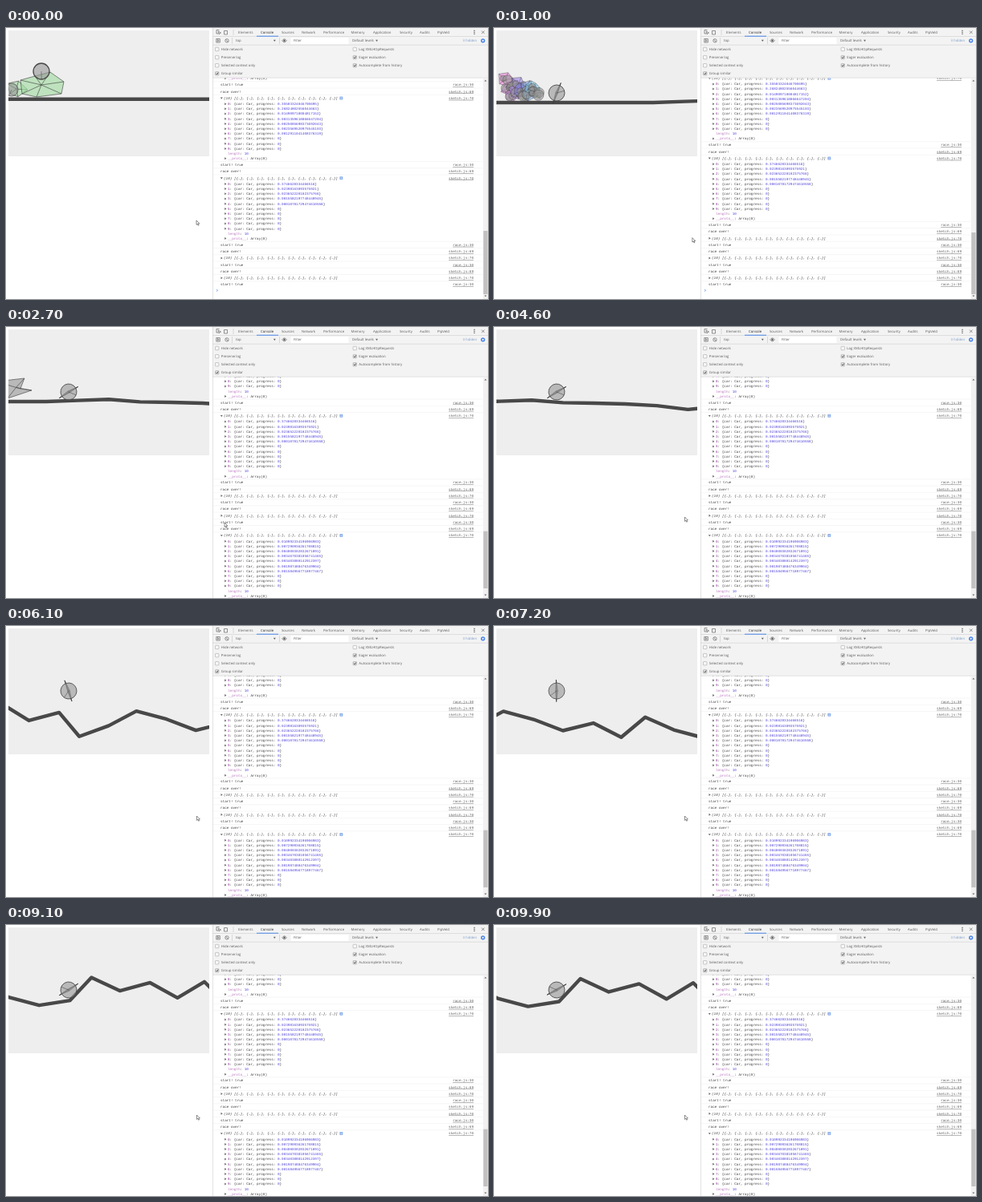
Animation, 600 px wide and 338 px high, one loop 10 s. Source, as an HTML page with a canvas:

```html
<!DOCTYPE html>
<html lang="en">
<head>
<meta charset="utf-8">
<title>Car race with console</title>
<style>
  html, body { margin: 0; width: 100%; height: 100%; overflow: hidden; background: #fff; }
  svg, canvas { position: absolute; display: block; }
  svg { left: 0; top: 0; width: 600px; height: 338px; }
  canvas { left: 3px; top: 3px; width: 250px; height: 157px; }
  text { font: 4.3px "Open Sans", "Noto Sans", sans-serif; fill: #5a5a5a; text-rendering: geometricPrecision; white-space: pre; }
  .active { fill: #222; }
  .hint { fill: #7b9cc9; }
  #log text { font-family: "Liberation Mono", "DejaVu Sans Mono", monospace; fill: #3a3a3a; }
  #log .preview { font-style: italic; }
  #log .link { text-decoration: underline; fill: #5a5a5a; }
  #log .key { fill: #8a2a96; }
  #log .dim { fill: #b871bd; }
  #log .num { fill: #4a3cda; }
  .icon { fill: none; stroke: #666; stroke-width: .7; }
</style>
</head>
<body>
<canvas id="scene"></canvas>
<svg viewBox="0 0 600 338">
  <defs><clipPath id="view"><rect x="258" y="62.5" width="335.5" height="276"/></clipPath></defs>
  <rect x="257" width="343" height="62" fill="#f3f3f3"/>
  <path d="M257.5 0V338M257 10.5H600M257 21.2H600M257 62.2H600" fill="none" stroke="#cfcfcf" stroke-width=".6"/>
  <rect x="312" y="9.7" width="27" height="1" fill="#4a86e8"/>
  <rect x="354.5" y="12" width="72" height="8" fill="#fff"/>
  <path d="M281.5 12V20M340.5 12V20M283 2V9" class="icon" style="stroke:#ccc"/>
  <path d="M262 2.5h3.5M262 2.5v4.5h2M264 4l1.2 4 .8-1.5 1.5-.5zM271.5 3.500h4v4.500h-4z" class="icon"/>
  <path d="M261.8 13.5h4.5v4.500h-4.500zM263.300 14.500v2.500l2-1.250z" class="icon"/>
  <g class="icon"><circle cx="275" cy="15.8" r="2.2"/><path d="M273.500 14.200l3 3.200"/></g>
  <path d="M332.800 14.800h3l-1.500 2.200zM460 14.800h3l-1.500 2.200z" fill="#666"/>
  <path d="M343.700 15.800q2.800-4 5.600 0q-2.800 4-5.600 0z" class="icon"/><circle cx="346.500" cy="15.800" r="1.200" fill="#555"/>
  <path d="M583 2.700v5.200" stroke="#555" stroke-width="1.200" stroke-dasharray="1.200 .8"/>
  <path d="M592 3.500l3.600 3.600M595.600 3.500l-3.600 3.600" class="icon"/>
  <circle cx="593.700" cy="15.800" r="1.900" fill="none" stroke="#4a86e8" stroke-width="1.500"/>
  <g id="head"></g>
  <g clip-path="url(#view)"><g id="log"></g></g>
  <rect x="593.8" y="62.5" width="6.2" height="275.5" fill="#f1f1f1"/>
  <rect id="thumb" x="594.3" width="5.2" fill="#c1c1c1"/>
  <path d="M595.400 66.500l1.500-1.800 1.500 1.800zM595.400 333.500l1.500 1.800 1.500-1.800z" fill="#666"/>
  <path id="cursor" d="M0 0V5.400L1.300 4.300 2.200 6.300 3.100 5.900 2.200 3.900H3.900Z" fill="#fff" stroke="#333" stroke-width=".55"/>
</svg>
<script>
const $ = id => document.getElementById(id);
const LOOP = 10000, NEW_RACE = 900, SPREAD = 1800, EXPAND = 2100, SCROLL = 2400;

// ---------- panel header ----------
const label = (x, y, s, cls = '') => `<text x="${x}" y="${y}" class="${cls}">${s}</text>`;
const tabs = { Elements: 289, Console: 317, Sources: 343, Network: 368, Performance: 395,
  Memory: 429.5, Application: 457, Security: 490, Audits: 515, PipVeld: 537 };

// A leading + marks a ticked box.
const options = (x, names) => names.map((name, i) => {
  const y = 26.5 + 10.1 * i, on = name[0] === '+';
  return `<rect x="${x}" y="${y - 2.2}" width="4.4" height="4.4" rx=".6" fill="${on ? '#ddd' : '#f8f8f8'}" stroke="#999" stroke-width=".5"/>` +
    (on ? `<path d="M${x + 1} ${y}l1.1 1.2 1.6-2.4" fill="none" stroke="#333" stroke-width=".8"/>` : '') +
    label(x + 7.3, y + 1.5, name.replace('+', ''));
}).join('');

$('head').innerHTML =
  Object.entries(tabs).map(([s, x]) => label(x, 6.8, s, s === 'Console' ? 'active' : '')).join('') +
  label(286, 17.4, 'top') + label(358, 17.4, 'Filter') + label(431, 17.4, 'Default levels') +
  label(568.5, 17.4, '3 hidden', 'hint') +
  options(260.5, ['Hide network', 'Preserve log', 'Selected context only', '+Group similar']) +
  options(432, ['Log XMLHttpRequests', '+Eager evaluation', '+Autocomplete from history']);

// ---------- console log ----------
const ROW = 8.25, PROP = 6.2;
const raceA = ['0.35503324046700695', '0.26824802556044663', '0.014909710004817152', '0.0031359618866647204',
  '0.0025085698373692043', '0.0023569520975545103', '0.0012911041408376319'];
const raceB = ['0.3746628334466516', '0.02398163093575921', '0.023652220102375766', '0.0015582197748448945',
  '0.00010781729474610558'];
const raceC = ['0.010992334196906983', '0.007290936261708815', '0.004000302832671891', '0.0034670381056741465',
  '0.003403880142912397', '0.001987488476349904', '0.0015849567718977467'];
const preview = '(10) [' + Array(10).fill('{…}').join(', ') + ']';

const span = (cls, s) => `<tspan class="${cls}">${s}</tspan>`;
const arrow = (x, y, down) =>
  `<path d="M${x} ${y}${down ? 'm-1.5-.8h3l-1.5 2.2z' : 'm-.8-1.5v3l2.2-1.5z'}" fill="#666"/>`;

function buildLog(state) {
  let y = 70.9, out = '';
  const row = (s, link, cls, x = 267) => {
    out += `<path d="M258 ${y - ROW / 2}H593.5" stroke="#ececec" stroke-width=".5"/>` + label(x, y + 1.4, s, cls) +
      `<text x="582" y="${y + 1.4}" text-anchor="end" class="link">${link}</text>`;
    y += ROW;
  };
  const proto = py => arrow(273, py) + label(276, py + 1.4, span('dim', '__proto__') + ': Array(0)');
  const start = () => row('start! true', 'race.js:30');
  const details = values => {
    y -= (ROW - PROP) / 2;
    for (let i = 0; i < 10; i++, y += PROP)
      out += arrow(273, y) +
        label(276, y + 1.4, span('key', i) + ': {car: Car, progress: ' + span('num', values[i] || 0) + '}');
    out += label(276, y + 1.4, span('dim', 'length') + ': ' + span('num', 10)) + proto(y + PROP);
    y += 2 * PROP + (ROW - PROP) / 2 + .6;
  };
  const result = values => {
    row('race over!', 'sketch.js:69');
    out += arrow(268.3, y, values);
    if (values) out += `<rect x="415.3" y="${y - 2}" width="4" height="4" rx=".7" fill="#8fb1ea"/>` +
      `<path d="M417.3 ${y - 1.2}v.6m0 .6v1.4" stroke="#fff" stroke-width=".7"/>`;
    row(preview, 'sketch.js:70', 'preview', 271);
    if (values) details(values);
    start();
  };
  out += proto(62.8);
  start();
  [raceA, raceB, null, null].forEach(result);
  if (state) result(state > 1 ? raceC : null);
  return out + `<path d="M262 ${y - 2.1}l1.5 1.3-1.5 1.3" fill="none" stroke="#4a86e8" stroke-width=".7"/>`;
}

let shown = -1;
function showLog(state) {
  if (state === shown) return;
  shown = state;
  const added = state ? 3 * ROW : 0, opened = state > 1 ? 12 * PROP + .6 : 0;
  const scroll = added + (state > 2 ? 51.7 : 0), scale = 264 / (922 + added + opened);
  $('log').innerHTML = buildLog(state);
  $('log').setAttribute('transform', `translate(0 ${-scroll})`);
  $('thumb').setAttribute('y', 68 + (646 + scroll) * scale);
  $('thumb').setAttribute('height', 276 * scale);
}

// ---------- motion ----------
// Smooth curve through rows of [time, ...values].
function follow(keys, t) {
  const last = keys.length - 1;
  if (t <= keys[0][0]) return keys[0].slice(1);
  if (t >= keys[last][0]) return keys[last].slice(1);
  const i = keys.findIndex(k => k[0] > t) - 1;
  const a = keys[i], b = keys[i + 1], p = keys[Math.max(i - 1, 0)], n = keys[Math.min(i + 2, last)];
  const d = b[0] - a[0], u = (t - a[0]) / d;
  return a.slice(1).map((v, k) => {
    const w = b[k + 1];
    const m0 = (w - p[k + 1]) / (b[0] - p[0]) * d, m1 = (n[k + 1] - v) / (n[0] - a[0]) * d;
    return v + (w - v) * u * u * (3 - 2 * u) + m0 * u * (1 - u) ** 2 - m1 * u * u * (1 - u);
  });
}

const ease = (t, from, to) => {
  const u = Math.min(1, Math.max(0, (t - from) / (to - from)));
  return u * u * (3 - 2 * u);
};
const mix = (a, b, u) => a + (b - a) * u;

function pointer(t) {
  const down = ease(t, 700, 1500), up = ease(t, 2000, 2500), home = ease(t, 3600, 4200);
  return [237 + 31 * down + 4 * up - 34.5 * home, 240 + 68 * down - 64 * up - 7 * home];
}

// time, camera x, camera y, car angle in degrees
const START = -225;
const ride = [[NEW_RACE, START - 4, 1, -70], [SPREAD, START, 1, -45], [2700, -81, 1, -29], [4600, 0, 0, -29],
  [5600, 150, 8, -15], [6100, 284.7, 1.8, 73], [6700, 368, 12, 86],
  [8300, 579.2, -18.6, 107], [9000, 652, 38, 148], [9900, 654.6, 39.5, 153]];

// ---------- track ----------
// Equal tiles laid end to end, each at its own heading in degrees.
const TILE = 39, FLAT_TILES = 14;
const headings = Array(FLAT_TILES).fill(0).concat([-2, -2, 4.5, 1, 1.5, 3, 7, -5.5, 32, -15, 50, -20, -28,
  15, 21, -14, 27, -40, 24, 15, -9, -47, 25, -15, 29, -31, 45]);
const track = [[-31 - FLAT_TILES * TILE, 94]];
headings.forEach((deg, i) => {
  const a = deg * Math.PI / 180, [x, y] = track[i];
  track.push([x + TILE * Math.cos(a), y + TILE * Math.sin(a)]);
});

// ---------- cars ----------
function seeded(seed) {
  return () => (seed = seed * 16807 % 2147483647) / 2147483647;
}

function blob(x, y, r, rand) {
  const n = 5 + Math.floor(rand() * 3);
  return Array.from({ length: n }, (_, i) => {
    const a = i / n * Math.PI * 2, d = r * (.5 + .7 * rand());
    return [x + d * Math.cos(a), Math.min(91, y + d * Math.sin(a))];
  });
}

const GRAY = 'rgba(150,150,150,.6)', GREEN = 'rgba(165,220,165,.65)';
const rand = seeded(4711);

// The heap is tall on the left, pink to cyan, and slopes down to the right.
const heap = Array.from({ length: 12 }, (_, i) => {
  const x = 4 + 5 * i, y = mix(50 + i * 1.6, 82, (i * 2 % 5) / 4);
  return {
    points: blob(x, y, 15, rand),
    fill: i % 4 === 3 ? GRAY : `hsla(${310 - 11 * i},70%,72%,.6)`,
    wheels: [-1, 1].map(side => [x + side * 8 * rand(), y + 5 * rand() - 2, 5 + 4 * rand()])
  };
});

const canvas = $('scene'), ctx = canvas.getContext('2d'), dpr = window.devicePixelRatio || 1;
canvas.width = 250 * dpr;
canvas.height = 157 * dpr;

function body(points, fill) {
  const [hx, hy] = [0, 1].map(k => points.reduce((s, p) => s + p[k], 0) / points.length);
  ctx.lineWidth = .6;
  ctx.strokeStyle = '#3c3c3c';
  ctx.fillStyle = fill;
  ctx.beginPath();
  points.forEach(([x, y]) => ctx.lineTo(x, y));
  ctx.closePath();
  ctx.fill();
  points.forEach(([x, y]) => { ctx.moveTo(hx, hy); ctx.lineTo(x, y); });
  ctx.stroke();
}

function wheel(x, y, r, angle = 0, line = .7) {
  ctx.beginPath();
  ctx.arc(x, y, r, 0, Math.PI * 2);
  ctx.fillStyle = GRAY;
  ctx.fill();
  ctx.lineWidth = line;
  ctx.strokeStyle = '#484848';
  ctx.stroke();
  ctx.beginPath();
  ctx.moveTo(x, y);
  ctx.lineTo(x + r * Math.cos(angle), y + r * Math.sin(angle));
  ctx.lineWidth = .5;
  ctx.stroke();
}

function ground(cx, cy) {
  ctx.strokeStyle = '#484848';
  ctx.lineWidth = 4.4;
  ctx.lineJoin = 'round';
  ctx.beginPath();
  track.forEach(([x, y]) => ctx.lineTo(x - cx, y - cy));
  ctx.stroke();
}

function oldRace() {
  ground(-290, 5.3);
  body(blob(12, 77, 13, seeded(7)), GREEN);
  body([[18, 65], [36, 60], [55, 55], [72, 67], [69, 82], [38, 86], [20, 82]], GREEN);
  wheel(7, 77, 8, 2);
  wheel(44, 54, 10, 1.55, 1.3);
}

function pile(t, shift) {
  const size = mix(.65, 1, ease(t, NEW_RACE, SPREAD));
  ctx.save();
  ctx.translate(shift + 36 * (1 - size), 91 * (1 - size));
  ctx.scale(size, size);
  heap.forEach(car => {
    body(car.points, car.fill);
    car.wheels.forEach(([x, y, r]) => wheel(x, Math.min(y, 91 - r), r, x + t / 400));
  });
  wheel(65, 80, 10, t / 400);
  ctx.restore();
}

function spikeCar(cx, t) {
  ctx.save();
  ctx.translate(t < 2700 ? mix(38, 0, (t - SPREAD) / 900) : -81 - cx, 0);
  body([[-12, 68], [23, 64], [18, 77], [32, 79], [2, 89]], GRAY);
  ctx.restore();
}

function leader(deg) {
  ctx.save();
  ctx.translate(78, 81);
  ctx.rotate(deg * Math.PI / 180);
  body([[-14, 1], [0, -1.3], [13.5, 0], [0, 1.3]], 'rgba(110,110,110,.6)');
  wheel(0, 0, 10, .9, .8);
  ctx.restore();
}

function drawScene(t) {
  ctx.setTransform(dpr, 0, 0, dpr, -3 * dpr, -3 * dpr);
  ctx.fillStyle = '#eee';
  ctx.fillRect(3, 3, 250, 157);
  if (t < NEW_RACE) return oldRace();
  const [cx, cy, angle] = follow(ride, t);
  ground(cx, cy);
  if (t < 2800) pile(t, t > SPREAD ? START - cx : 0);
  if (t > SPREAD && t < 4600) spikeCar(cx, t);
  leader(angle);
}

function frame(now) {
  const t = now % LOOP;
  showLog([NEW_RACE, EXPAND, SCROLL].filter(at => t >= at).length);
  $('cursor').setAttribute('transform', `translate(${pointer(t)})`);
  drawScene(t);
  requestAnimationFrame(frame);
}
frame(performance.now());
</script>
</body>
</html>
```
